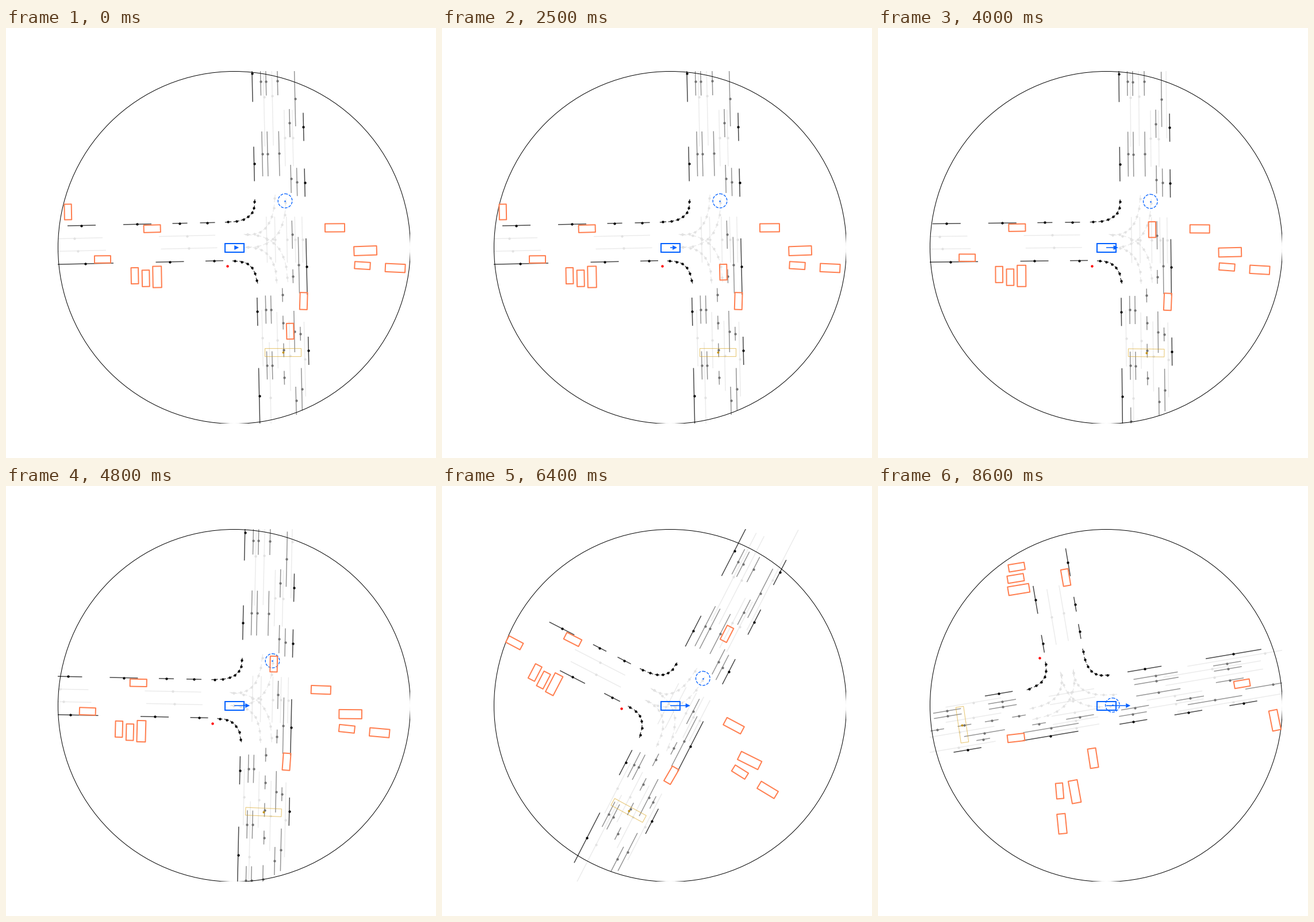
A matplotlib script for the animation above (8700 ms loop, 748 by 748 pixels).

```python
import numpy as np
import matplotlib.pyplot as plt
from matplotlib.animation import FuncAnimation
from matplotlib.collections import LineCollection, PolyCollection
from matplotlib.patches import Circle, Polygon, Rectangle

SIZE, DPI = 748, 100
FRAMES, STEP = 87, 100
PT = 72 / DPI
CENTER = np.array([397.0, 381.5])
RANGE = 306.6
SLOPE = .0224            # tilt of the road grid
PIECE = 24.5             # usual half length of a lane piece
BLUE, CORAL, GOLD = "#0060ff", "#ff7f50", "#daa520"


def rot(deg):
    a = np.radians(deg)
    return np.array([[np.cos(a), -np.sin(a)], [np.sin(a), np.cos(a)]])


# --- motion of the ego car -------------------------------------------------

KNOTS = np.array([0, 16, 32, 48, 64, 75, 86])
TURN = np.array([0, 0, 0, 2.5, 28.48, 58.86, 81.69])
SPEED = np.array([0, .1, .6, 1.9, 2.65, 3, 3.4])
EGO = np.array([(0, 0), (.5, 0), (5, 0), (25.5, -.6),
                (61.1, -12.8), (79.5, -37.1), (87.4, -70.9)])


def gentle_slopes(vals):
    """Harmonic mean of neighbouring slopes, so the curve never overshoots."""
    d = np.diff(vals) / np.diff(KNOTS)
    mid = 2 * d[:-1] * d[1:] / np.maximum(d[:-1] + d[1:], 1e-9)
    return np.r_[d[0], mid, 1.5 * d[-1] - .5 * mid[-1]]


def hermite(frame, vals, slopes):
    i = min(np.searchsorted(KNOTS, frame, side="right") - 1, len(KNOTS) - 2)
    h = KNOTS[i + 1] - KNOTS[i]
    t = (frame - KNOTS[i]) / h
    a = 3 * t ** 2 - 2 * t ** 3
    return (vals[i] * (1 - a) + vals[i + 1] * a
            + h * (slopes[i] * t * (1 - t) ** 2
                   + slopes[i + 1] * t ** 2 * (t - 1)))


# The car rolls along its heading and swings around its rear axle
TURN_RATE = gentle_slopes(TURN)
swing = 10 * np.radians(TURN_RATE)
c, s = np.cos(np.radians(TURN)), np.sin(np.radians(TURN))
EGO_RATE = np.stack([SPEED * c - swing * s, -SPEED * s - swing * c], 1)


# --- map -------------------------------------------------------------------

def down(x, y, half=PIECE, n=1, step=97):
    """Pieces of a column that crosses the middle row at x."""
    d = np.array([SLOPE, 1])
    return [(np.array([x, CENTER[1]]) + d * (y + i * step - CENTER[1]),
             d * half) for i in range(n)]


def across(y, x, half=PIECE, n=1, step=97):
    """Pieces of a row that crosses the middle column at y."""
    d = np.array([1, -SLOPE])
    return [(np.array([CENTER[0], y]) + d * (x + i * step - CENTER[0]),
             d * half) for i in range(n)]


def bend(a, b, c, n):
    """Short dashes along a quadratic curve."""
    t = np.linspace(0, 1, n)[:, None]
    a, b, c = map(np.array, (a, b, c))
    p = (1 - t) ** 2 * a + 2 * t * (1 - t) * b + t ** 2 * c
    return list(zip(p, .39 * np.gradient(p, axis=0)))


edges = (down(434.3, 79, 49) + down(434.3, 236, 30)
         + down(434.3, 493) + down(434.3, 640, 49)
         + down(521.7, 74.5, n=3) + down(521.7, 414.5, 49)
         + down(521.7, 561)
         + across(337.1, 131, n=2) + across(337.1, 302, 13, 2, 48)
         + across(403.8, 138, 48.5) + across(403.8, 284.5)
         + across(403.8, 362, 15.5)
         + bend((386, 337), (433, 336), (432, 301.5), 7)
         + bend((398, 405), (430, 404), (436, 439), 6))

marks = []
for x in (448.9, 458.2):
    marks += down(x, 92.5) + down(x, 218.5, 39) + down(x, 489.4, n=3)
marks += (down(478.3, 92) + down(478.3, 218, 39)
          + down(478.6, 464, 12, 4, 48) + down(478.2, 680.5)
          + down(498, 18.5, 49) + down(497.8, 165, n=3)
          + down(497.6, 431.3, 12) + down(497.8, 527.5, 36)
          + down(498.1, 648)
          + down(508, 122.5, 48) + down(508.2, 267.3)
          + down(508.2, 412, 49) + down(508.2, 531.3, 12)
          + down(508.5, 628, 37))

lanes = []
for x in (453.4, 468, 488.4, 502.9, 515.4):
    lanes += down(x, 367.7, 40)
lanes += (down(453.9, 119.5, 86) + down(468.6, 118, 86)
          + down(488.6, 191, 49) + down(502.6, 191, 49)
          + down(516.5, 92, 98) + down(442, 24.5, 137)
          + down(442.1, 539, 49) + down(468.1, 542.5, 49)
          + down(453.8, 643, 97) + down(489, 569.8, 61)
          + down(515, 575.5, 65)
          + across(359.2, 118.5, 49, 2, 196)
          + across(381.1, 124.5, 49, 2, 193.5)
          + bend((420, 359), (464, 360), (467, 296), 8)
          + bend((421, 381), (467, 381), (470, 438), 8)
          + bend((421, 381), (484, 380), (486, 304), 8)
          + bend((420, 359), (485, 360), (489, 434), 8))


# --- cars ------------------------------------------------------------------

def box(x, y, w, h, tilt=0):
    corners = np.array([(-w, -h), (w, -h), (w, h), (-w, h)]) / 2
    return corners @ rot(tilt).T + (x, y)


# x, y, length, heading; the width follows the length
PARKED = [(107.3, 319.5, 27, 89), (253.7, 348.6, 29, -1.5),
          (167.5, 402, 28, -.5), (223.5, 430.5, 28, 89),
          (242.7, 435, 28.5, 89), (262.5, 432.5, 37, 89),
          (571.5, 347, 34, -.4), (624.6, 387, 39.5, -2),
          (619.5, 412.7, 27, 3.5), (676.6, 417, 34.5, 2.6),
          (517.2, 474.5, 29.5, 91.7), (552, 24.5, 35.5, -3)]


def moving_car(k):
    run = k * (3.5 + .026 * k - 6e-5 * k ** 2)
    return 493.8 - .0285 * run, 527 - run, 27.3, 88.7


def near(points, ego):
    return np.hypot(*(points - CENTER - ego).T) < RANGE


# --- stage -----------------------------------------------------------------

fig = plt.figure(figsize=(SIZE / DPI, SIZE / DPI), dpi=DPI, facecolor="white")
ax = fig.add_axes([0, 0, 1, 1])
ax.set_xlim(-.5, SIZE - .5)
ax.set_ylim(SIZE - .5, -.5)
ax.axis("off")
window = Rectangle((89.5, 74.5), 613.5, 613.5, transform=ax.transData)


def clipped(artist):
    artist.set_clip_path(window)
    return artist


def dot(color, size, **kw):
    return clipped(ax.plot([], [], "o", color=color, ms=size * PT, mew=0,
                           **kw)[0])


class Layer:
    """Lane pieces with a dot at the middle of each."""

    def __init__(self, items, alpha, color, z):
        self.mid, self.half = (np.array(v) for v in zip(*items))
        self.lines = clipped(ax.add_collection(LineCollection(
            [], colors=[(0, 0, 0, alpha)], linewidths=1.5 * PT, zorder=z)))
        self.dots = dot(color, 4.3, zorder=z + .1)

    def update(self, view, ego):
        seen = near(self.mid, ego)
        m, h = self.mid[seen], self.half[seen]
        self.lines.set_segments(list(np.stack([view(m - h), view(m + h)], 1)))
        self.dots.set_data(*view(m).T)


layers = [Layer(lanes, .08, "#e2e2e2", 1),
          Layer(marks, .42, "#737373", 2),
          Layer(edges, .72, "black", 3)]

clipped(ax.add_patch(Circle((396.5, 381.5), 306.5, fill=False, ec="black",
                            lw=PT, zorder=4)))
STOP = box(481, 563.7, 62.5, 13.5)
stop = clipped(ax.add_patch(Polygon(STOP, fill=False, ec=GOLD, alpha=.6,
                                    lw=1.1 * PT, zorder=5)))
goal = ax.add_patch(Circle((0, 0), 12.3, fill=False, ec=BLUE, lw=1.3 * PT,
                           ls=(0, (3.7, 1.6)), zorder=6))
GOAL = (485, 300.2)
dots = [(dot("#c4951c", 4, zorder=5), (481.5, 564)),
        (dot("red", 4.4, zorder=5), (385, 414)),
        (dot(BLUE, 3, alpha=.75, zorder=6), GOAL)]
cars = clipped(ax.add_collection(PolyCollection(
    [], facecolors="none", edgecolors=CORAL, linewidths=2 * PT, zorder=7)))
ax.add_patch(Rectangle((380.2, 374.3), 33, 14.8, fill=False, ec=BLUE,
                       lw=2 * PT, zorder=8))
shaft, = ax.plot([], [], color=BLUE, lw=1.5 * PT, solid_capstyle="butt",
                 zorder=8)
head = ax.add_patch(Polygon([(0, 0)] * 3, fc=BLUE, ec=BLUE, lw=.6 * PT,
                            zorder=8))


def draw(frame):
    ego = hermite(frame, EGO, EGO_RATE)
    turn = rot(hermite(frame, TURN, TURN_RATE))

    def view(p):
        return (np.asarray(p) - CENTER - ego) @ turn.T + CENTER

    for layer in layers:
        layer.update(view, ego)

    cars.set_verts([view(box(x, y, size, 5 + .27 * size, heading))
                    for x, y, size, heading in PARKED + [moving_car(frame)]
                    if near(np.array([x, y]), ego)])
    stop.set_xy(view(STOP))
    goal.center = tuple(view(GOAL))
    for mark, place in dots:
        x, y = view(place)
        mark.set_data([x], [y])

    # The arrow shows how far the car gets in one second
    tip = 397 + 10 * np.interp(frame, KNOTS, SPEED)
    shaft.set_data([397, tip], [381.5, 381.5])
    head.set_xy([(tip, 378), (tip + 7, 381.5), (tip, 385)])
    return []


anim = FuncAnimation(fig, draw, frames=FRAMES, interval=STEP, repeat=True,
                     repeat_delay=0, init_func=lambda: draw(0), blit=False)
plt.show()
```
